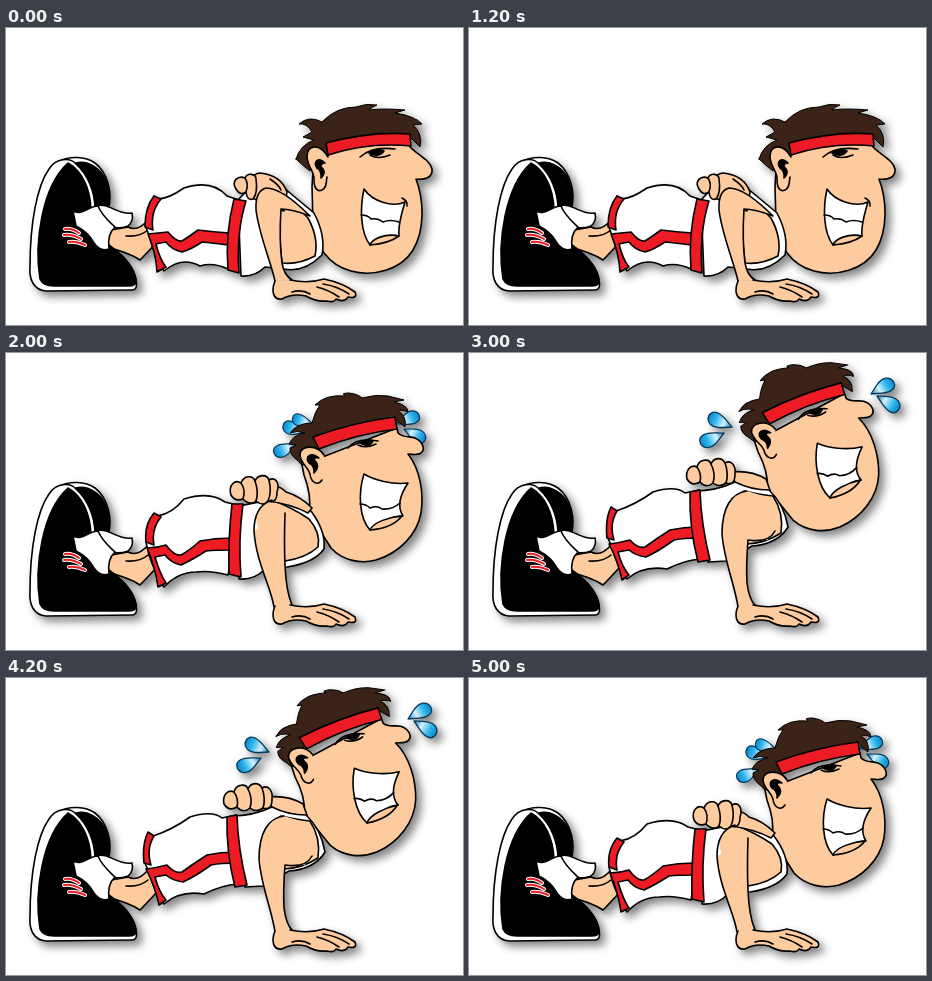
These frames come from a looping animation (457x297 px, 5100 ms). An HTML page:

```html
<!DOCTYPE html>
<html lang="en">
<head>
<meta charset="utf-8">
<title>Push-ups</title>
<style>
html, body { margin: 0; width: 100%; height: 100%; overflow: hidden; background: #fff; }
svg { display: block; width: 457px; height: 297px; }
.all { filter: drop-shadow(5px 5px 4px rgba(0, 0, 0, .48)); }
path { stroke: #000; stroke-width: 1.6; stroke-linejoin: round; stroke-linecap: round; fill: none; }
.skin { fill: #fdcb9e; }
.white { fill: #fff; }
.red { fill: #ed1c24; }
.black { fill: #000; }
.hair { fill: #3b2317; stroke-width: 1; }
.drop { fill: url(#water); stroke: #06385a; stroke-width: 1.2; }
.lace { stroke: #ed1c24; stroke-width: 2; }
.edge { stroke: #fff; stroke-width: 4; }
.flat { stroke: none; }
</style>
</head>
<body>
<svg viewBox="0 0 457 297">
  <defs>
    <linearGradient id="water">
      <stop offset="0" stop-color="#0d7cc0"/>
      <stop offset=".35" stop-color="#d8f3fc"/>
      <stop offset=".7" stop-color="#2fb4ec"/>
      <stop offset="1" stop-color="#0b86cc"/>
    </linearGradient>
  </defs>
  <g class="all" id="stage"></g>
</svg>
<script>
const NS = 'http://www.w3.org/2000/svg';
const stage = document.getElementById('stage');

function add(parent, tag, attrs) {
  const el = document.createElementNS(NS, tag);
  for (const key in attrs) el.setAttribute(key, attrs[key]);
  parent.append(el);
  return el;
}

// Each part is [class, path data]
const draw = (parent, parts) =>
  parts.forEach(([cls, d]) => add(parent, 'path', { class: cls, d }));

const calm = [
  ['skin', 'M308 128L404 108V119C413 128 424 132 426 141C427 150 418 152 410 151C418 172 419 202 407 222C395 242 367 249 345 243C322 237 309 217 307 195L306 158Z'],
  ['hair', 'M290 131Q294 117 308 112L297 109L306 104Q301 95 293 96Q303 87 316 94Q330 79 350 79Q360 75 371 77Q366 79 363 82Q378 80 399 82L389 85Q409 88 416 96L407 97Q417 106 414 119L405 110Q360 108 321 128Q318 131 315 127Q306 126 304 143Q296 137 290 131Z'],
  ['red', 'M320 115Q365 103 404 106L405 118Q362 114 322 127Z'],
  ['skin', 'M322 129C314 115 301 116 301 129C302 140 309 144 308 152C308 161 312 164 316 162C321 160 320 154 321 149'],
  ['black', 'M319 135C312 128 307 134 311 140Q316 143 315 150Q320 145 317 141Q312 136 319 135Z'],
  ['', 'M354 129Q366 118 389 121M364 127Q372 132 384 127'],
  ['black', 'M363 125Q370 120 378 123Q373 130 363 125Z'],
  ['white', 'M358 161C366 173 386 180 399 174C395 187 392 199 393 208C384 206 374 212 364 217C354 204 354 179 358 161Z'],
  ['skin', 'M364 217C366 211 379 205 393 208C385 214 376 216 364 217Z'],
  ['', 'M355 187Q362 187 365 191Q372 190 377 194Q384 191 393 194M396 170Q402 173 401 178']
];

const strained = [
  ['skin', 'M296 112L391 75L392 80C397 85 404 83 409 85C416 88 420 96 415 100C411 103 407 101 402 101C414 116 418 140 415 160C411 182 393 200 370 207C355 211 337 208 325 195L303 160Q306 143 298 122Z'],
  ['hair', 'M292 108Q283 101 284 95L290 92L283 91Q287 82 299 80Q291 77 284 80Q291 70 306 70Q309 58 314 52L309 52Q320 41 339 43Q334 40 343 40Q352 41 356 45Q370 41 382 43L398 47Q392 48 388 49Q402 52 402 59Q395 56 392 58Q401 63 399 74L390 67L313 92Q311 96 302 95Q293 100 296 112Z'],
  ['red', 'M307 84Q348 69 389 64L391 76Q350 81 313 96Z'],
  ['skin', 'M318 102C311 91 294 92 294 102C295 111 302 114 304 121C305 130 312 133 316 127'],
  ['black', 'M313 105C305 98 298 104 303 110Q309 113 308 120Q314 114 310 109Q305 104 313 105Z'],
  ['', 'M342 95Q350 84 372 88M352 92Q360 96 370 91'],
  ['black', 'M354 90Q360 85 367 88Q363 95 354 90Z'],
  ['white', 'M358 121C368 127 386 132 402 130C394 142 391 154 397 163C386 162 374 171 364 177C353 165 352 140 358 121Z'],
  ['skin', 'M364 177C367 169 384 164 396 163C389 172 377 176 364 177Z'],
  ['', 'M354 151Q360 151 364 155Q371 152 376 156Q386 157 394 150']
];

const feet = [
  ['white', 'M54 133C63 128 79 128 89 135C102 145 107 166 102 182L82 189Z'],
  ['black', 'M70 135C80 132 95 139 100 153C105 166 104 175 102 182L86 184C86 160 80 145 70 135Z'],
  ['skin', 'M100 203L122 199Q132 204 142 192L150 215Q140 226 134 232Q122 224 100 219Z'],
  ['', 'M120 208Q134 209 142 202'],
  ['white', 'M91 178C102 174 113 188 126 185Q128 193 122 198Q109 203 94 195Z'],
  ['white', 'M40 263C28 262 23 252 24 239C24 195 31 158 43 141C50 130 64 129 70 136C82 147 89 164 89 181L73 199C95 211 127 229 130 252Q132 262 126 262Z'],
  ['black', 'M34 251C28 215 36 158 62 135C76 143 84 160 85 181L70 184Q68 195 73 199C95 211 127 229 130 252Q131 258 122 258H48Q37 258 34 251Z'],
  ['white', 'M67 183C76 188 83 178 92 178C96 188 104 194 109 199Q101 206 103 221Q94 224 88 215Q82 204 70 198Z'],
  ['edge', 'M59 201Q66 200 73 205M58 207Q66 206 75 211M63 214Q70 213 79 217'],
  ['lace', 'M59 201Q66 200 73 205M58 207Q66 206 75 211M63 214Q70 213 79 217']
];

const hand = ['skin', 'M269 253C265 263 267 272 276 271Q286 265 300 268Q310 274 321 273Q328 275 330 271Q338 275 342 269Q352 271 349 264Q337 255 318 251Q302 256 284 252'];
const fingers = 'M286 264Q296 261 304 266M311 259Q323 262 333 269M317 256Q331 258 343 266';

const low = [
  ['white', 'M232 172Q245 156 266 150L308 185Q320 208 316 227Q298 245 278 241L259 239Q249 249 235 248Z'],
  ['skin', 'M268 155L302 190Q313 210 309 228Q292 237 276 235Z'],
  ['white', 'M152 171Q162 171 178 160Q206 151 221 168L236 173L222 241Q207 234 194 238Q176 228 158 243Q148 227 143 207L139 197Q145 182 148 168Z'],
  ['red', 'M148 168L155 171Q144 184 147 202L139 199Q139 179 148 168Z'],
  ['red', 'M142 206Q152 205 162 204Q170 214 176 213Q184 208 192 202Q208 204 223 205L222 217Q206 215 196 214Q184 222 176 224Q166 222 160 214Q154 215 150 216Q154 232 160 239L151 244Q150 225 142 206Z'],
  ['red', 'M228 171L240 173Q230 205 233 245L222 242Q219 206 228 171Z'],
  ['skin', 'M246 170C241 155 247 145 254 145Q275 147 281 164L278 183Z'],
  ['skin', 'M230 161C225 153 232 147 239 150C242 144 250 146 250 151Q252 165 247 171Q241 173 240 164Q234 168 230 161Z'],
  ['', 'M239 150Q243 156 240 164M264 151Q273 157 275 162'],
  ['skin', 'M269 253C265 234 253 207 250 182Q249 163 260 160Q276 160 304 188Q286 181 275 181Q273 212 276 235Q278 247 286 252']
];

const mid = [
  ['white', 'M232 153Q245 151 262 147Q285 150 305 158Q320 178 318 196Q308 210 281 214L259 216Q249 227 233 226Z'],
  ['skin flat', 'M250 166Q255 148 266 147Q287 155 303 166Q315 180 312 194Q300 205 279 208L262 215Z'],
  ['', 'M266 147Q287 155 303 166Q315 180 312 194Q300 205 279 208'],
  ['skin', 'M266 134Q273 132 280 139Q294 143 306 155L302 160Q285 151 262 148Z'],
  ['white', 'M151 163Q166 161 178 146Q204 138 219 149L235 153L222 222Q204 217 190 219Q172 219 158 234Q148 218 143 202L140 189Q142 172 151 163Z'],
  ['red', 'M148 160L155 164Q145 176 148 192L140 189Q138 172 148 160Z'],
  ['red', 'M141 195Q151 195 160 192Q168 203 175 202Q184 197 194 188Q209 185 225 185L224 197Q210 197 200 198Q186 207 175 212Q165 210 159 202Q154 203 149 204Q154 221 160 230L152 234Q149 213 141 195Z'],
  ['red', 'M226 151L237 151Q232 188 235 224L223 221Q222 185 226 151Z'],
  ['skin', 'M225 142C222 132 229 126 235 130C238 122 247 122 249 128C252 121 261 121 263 127C270 123 274 131 271 139Q271 151 262 148Q257 154 250 148Q244 153 237 146Q229 149 225 142Z'],
  ['', 'M235 130Q240 137 237 146M249 128Q253 139 250 148M263 127Q266 139 262 148'],
  ['skin flat', 'M268 255C265 234 250 209 248 178L279 160Q278 200 279 212Q280 238 286 255Z'],
  ['', 'M268 254C265 234 250 209 248 178Q248 153 266 147M279 160Q278 190 279 212Q280 238 286 252']
];

const high = [
  ['skin', 'M262 119Q282 117 297 126L302 140L270 140Z'],
  ['white', 'M226 138Q247 138 266 129Q282 137 300 137Q315 151 319 174Q309 191 283 193L257 208L239 209Z'],
  ['skin', 'M259 162Q262 145 275 138Q293 142 304 143Q315 160 312 180Q297 190 278 191Z'],
  ['white', 'M147 158Q166 152 184 139Q206 132 216 140L230 137L232 206Q216 207 198 216Q174 212 158 226Q147 210 143 194L138 183Q140 166 147 158Z'],
  ['red', 'M142 154L148 158Q140 171 145 187L138 185Q136 166 142 154Z'],
  ['red', 'M140 191Q150 190 161 187Q169 196 176 194Q187 186 201 177Q215 174 229 174L230 185Q215 185 205 187Q190 198 177 204Q167 203 160 197Q154 198 149 199Q153 214 160 222L153 227Q149 208 140 191Z'],
  ['red', 'M221 139L231 137Q232 171 241 207L229 209Q220 174 221 139Z'],
  ['skin', 'M218 126C216 117 222 111 228 114C230 106 240 105 242 111C245 104 253 104 256 110C263 106 267 114 266 121Q266 133 257 130Q250 135 244 130Q237 136 231 129Q223 134 218 126Z'],
  ['', 'M228 114Q233 121 231 129M242 111Q247 121 244 130M256 110Q260 121 257 130'],
  ['skin flat', 'M269 255C266 232 255 208 253 181C253 155 262 140 278 138L304 146L299 187L279 188Q277 212 278 230Q280 246 286 255Z'],
  ['', 'M269 254C266 232 255 208 253 181C253 155 262 140 278 138M306 178Q300 190 279 187Q277 212 278 230Q280 246 286 252']
];

// Drops: x, y of the tip, angle, size
const poses = [
  { head: calm, body: low, drops: [], on: [[0, 2000]] },
  { head: strained, body: mid, on: [[2000, 3000], [5000, 5100]],
    drops: [[300, 79, 195, 1], [290, 91, 155, 1], [307, 71, 196, .9], [391, 71, -24, 1], [398, 76, 27, 1]] },
  { head: strained, turn: 'translate(-10.6 -24.5) rotate(-7 307 110)', body: high, on: [[3000, 5000]],
    drops: [[263, 74, 204, 1.08], [255, 80, 155, 1.08], [402, 41, -30, 1.08], [408, 43, 30, 1.08]] }
];
const LOOP = 5100;
const dropShape = 'M0 0C8 -4 14 -8 19 -6C26 -3 25 6 18 6.5C12 7 7 3 0 0Z';

draw(stage, feet);
for (const pose of poses) {
  pose.el = add(stage, 'g');
  for (const [x, y, angle, size] of pose.drops)
    add(pose.el, 'path', { class: 'drop', d: dropShape, transform: `translate(${x} ${y}) rotate(${angle}) scale(${size})` });
  draw(add(pose.el, 'g', { transform: pose.turn || '' }), pose.head);
  draw(pose.el, [...pose.body, hand, ['', fingers]]);
}

function tick() {
  const t = performance.now() % LOOP;
  for (const { el, on } of poses)
    el.style.display = on.some(([a, b]) => t >= a && t < b) ? '' : 'none';
  requestAnimationFrame(tick);
}
tick();
</script>
</body>
</html>
```
